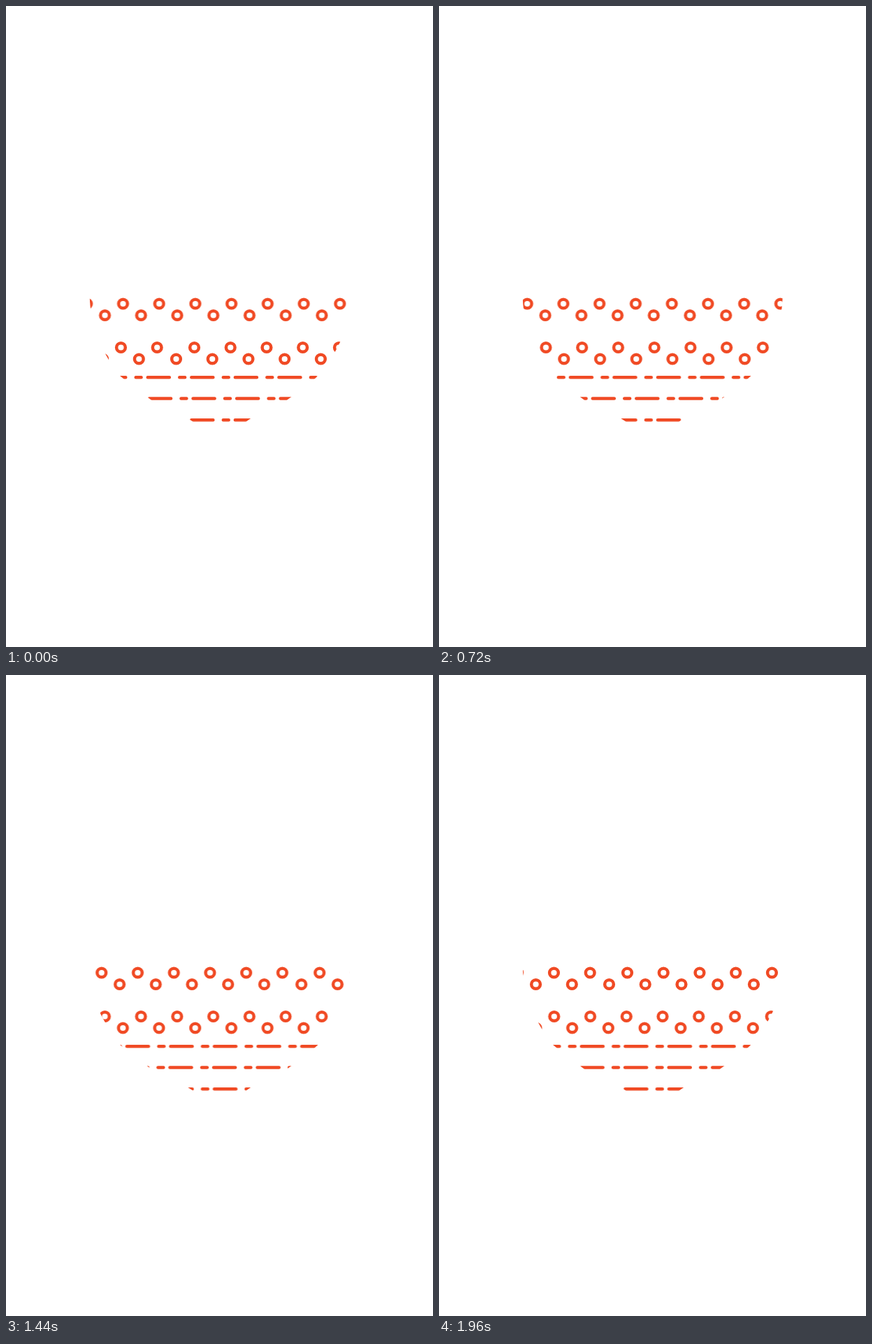
Write an HTML page without scripts that moves like this. It is 611x917 px and loops after 2 s.

```html
<!DOCTYPE html>
<html lang="en">
<head>
<meta charset="utf-8">
<title>Patterned bowl</title>
<style>
  html, body { margin: 0; width: 100%; height: 100%; overflow: hidden; background: #fff; }
  svg { display: block; width: 611px; height: 917px; }

  /* rings: round dots with a smaller white dot on top */
  .dots { fill: none; stroke-linecap: round; stroke-dasharray: .01 51.72; }
  .rim { stroke: #f04a24; stroke-width: 17.2px; }
  .hole { stroke: #fff; stroke-width: 8.2px; }

  .dash {
    fill: none; stroke: #f04a24; stroke-width: 4.6px; stroke-linecap: round;
    stroke-dasharray: 31 14.5 7.8 9.25;
  }

  .move { animation: slide 2s steps(50) -5ms infinite; }
  .r1 { --from: 675.5px; --to: -13.8px; }
  .r2 { --from: 0px; --to: 686.5px; }
  .r3 { --from: 0px; --to: -1084px; }
  .r4 { --from: 0px; --to: 1083.5px; }
  @keyframes slide {
    from { transform: translateX(var(--from)); }
    to { transform: translateX(var(--to)); }
  }
</style>
</head>
<body>
<svg viewBox="0 0 611 917">
  <defs>
    <clipPath id="bowl">
      <polygon points="119.7,416 120.2,426 121.2,435 124,449 133,480 136.8,488 143.5,500
        150.8,513 163,529 168.5,533.5 201.5,559 208,563.8 260,589.8 268,595
        343,595 350.5,589.8 402,563.8 408.5,559 441.5,533.5 446.5,529 460.5,513
        468,500 474.5,488 478.5,480 487.5,449 490.2,435 491.2,426 491.7,416"/>
    </clipPath>
    <!-- zigzag of dots, with a slightly wider gap where two strips meet -->
    <path id="zigzag" d="M216.2 426H-600M190.3 442.5H-600M243.5 442.5H530M269.5 426H530"/>
    <g id="rings">
      <use href="#zigzag" class="dots rim"/>
      <use href="#zigzag" class="dots hole"/>
    </g>
  </defs>

  <g clip-path="url(#bowl)">
    <g class="move r1"><use href="#rings"/></g>
    <g class="move r2"><use href="#rings" y="62.5"/></g>
    <g class="move r3">
      <path class="dash" d="M140.25 531.2H1620"/>
      <path class="dash" d="M140.25 592.2H1620"/>
    </g>
    <g class="move r4"><path class="dash" d="M-983.4 561.5H480"/></g>
  </g>
</svg>
</body>
</html>
```
